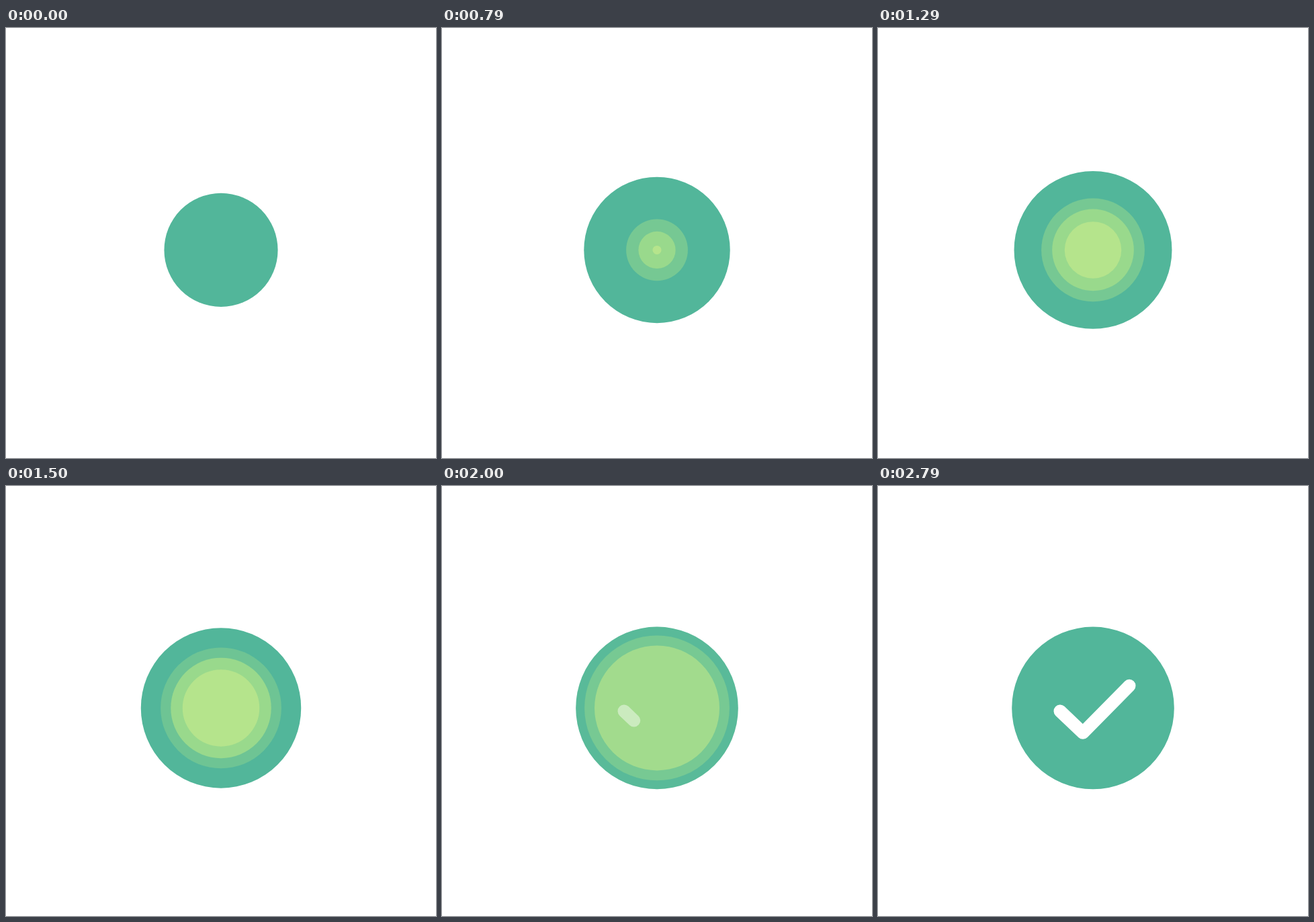
These frames come from a looping animation (640x640 px, 3.21 s). An HTML page with a canvas:

```html
<!DOCTYPE html>
<html lang="en">
<head>
<meta charset="utf-8">
<title>Success check</title>
<style>
  html, body { margin: 0; height: 100%; overflow: hidden; background: #fff; }
  canvas { display: block; }
</style>
</head>
<body>
<canvas id="stage" width="640" height="640"></canvas>
<script>
const ctx = document.getElementById('stage').getContext('2d');
const LOOP = 3210, CX = 320, CY = 330.4, RADIUS = 120.8;
const BASE_COLOR = '#52b69a', RING_COLORS = ['#76c893', '#99d98c', '#b5e48c'];
const CHECK_START = 1885, CHECK_LENGTH = Math.hypot(34, 32.3) + Math.hypot(69, 70);

const progress = (t, start, end) => Math.min(1, Math.max(0, (t - start) / (end - start)));

// CSS "ease": cubic-bezier(.25, .1, .25, 1)
function ease(x) {
  const bezier = (s, a, b) => 3 * (1 - s) ** 2 * s * a + 3 * (1 - s) * s * s * b + s ** 3;
  let low = 0, high = 1;
  for (let i = 0; i < 24; i++) {
    const mid = (low + high) / 2;
    if (bezier(mid, .25, .25) < x) low = mid; else high = mid;
  }
  return bezier(high, .1, 1);
}

function disc(scale, color, alpha = 1) {
  ctx.globalAlpha = alpha;
  ctx.fillStyle = color;
  ctx.beginPath();
  ctx.arc(CX, CY, RADIUS * scale, 0, 2 * Math.PI);
  ctx.fill();
}

// Staggered rings grow at a steady rate from the centre, then fade out.
function ring(t, color, i) {
  const scale = progress(t, 50 + 325 * i, 2000 + 195 * i);
  const fade = progress(t, 1320 + 190 * i, 2160 + 270 * i);
  disc(scale, color, 1 - fade);
}

function check(t) {
  if (t <= CHECK_START) return;
  ctx.globalAlpha = progress(t, CHECK_START, 2150);
  ctx.strokeStyle = '#fff';
  ctx.lineWidth = 19;
  ctx.lineCap = ctx.lineJoin = 'round';
  ctx.setLineDash([CHECK_LENGTH * ease(progress(t, CHECK_START, 2800)), CHECK_LENGTH * 2]);
  ctx.beginPath();
  ctx.moveTo(271, 335);
  ctx.lineTo(305, 367.3);
  ctx.lineTo(374, 297.3);
  ctx.stroke();
}

function draw(now) {
  const t = now % LOOP;
  ctx.globalAlpha = 1;
  ctx.fillStyle = '#fff';
  ctx.fillRect(0, 0, 640, 640);
  disc(0.7 + 0.3 * ease(progress(t, 0, 2030)), BASE_COLOR);
  RING_COLORS.forEach((color, i) => ring(t, color, i));
  check(t);
  requestAnimationFrame(draw);
}

requestAnimationFrame(draw);
</script>
</body>
</html>
```
